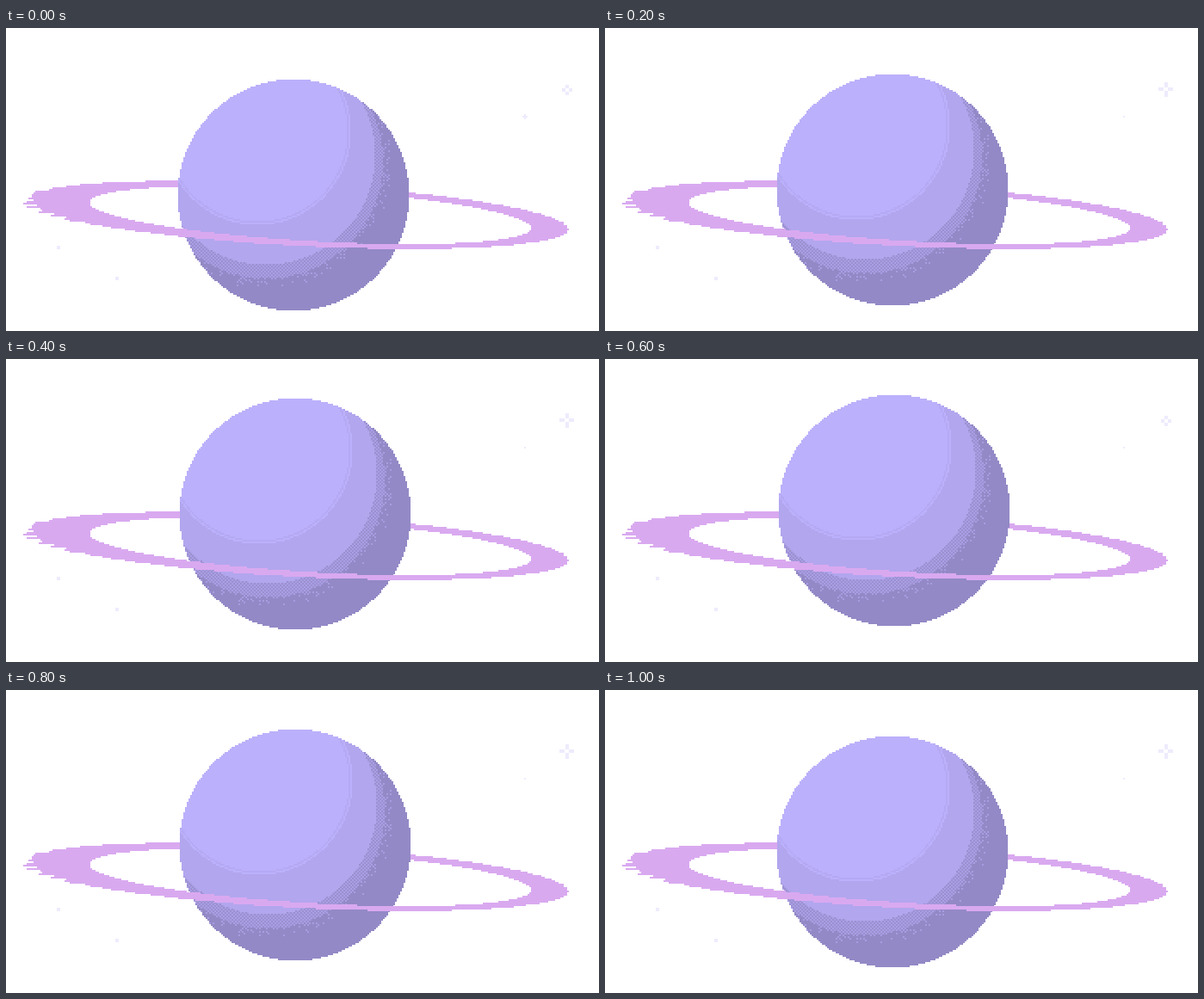
Write an HTML page with a canvas that moves like this. It is 689 px wide and 352 px high and loops after 1.2 s.

```html
<!DOCTYPE html>
<html lang="en">
<head>
<meta charset="utf-8">
<title>Floating planet</title>
<style>
  html, body { margin: 0; width: 100%; height: 100%; overflow: hidden; background: #fff; }
  canvas, svg { position: absolute; left: 0; top: 0; }
  #planet { left: 200px; top: 60px; animation: bob 1.2s step-end infinite; }
  svg { fill: #eeebfd; shape-rendering: crispEdges; }
  #small { animation: small 1.2s step-end infinite; }
  #large { animation: large 1.2s step-end infinite; }
  #plus { animation: plus 1.2s step-end infinite; }
  @keyframes bob {
    0%, 100% { transform: translate(0, 0); }
    16.6667%, 83.3333% { transform: translate(0, -6px); }
    33.3333%, 66.6667% { transform: translate(2px, -14px); }
    50% { transform: translate(2px, -18px); }
  }
  @keyframes small {
    0%, 50%, 100% { opacity: 1; }
    16.6667%, 66.6667% { opacity: 0; }
  }
  @keyframes large {
    0%, 50%, 100% { opacity: 0; }
    16.6667%, 66.6667% { opacity: 1; }
  }
  @keyframes plus {
    0%, 100% { opacity: 1; }
    16.6667% { opacity: 0; }
  }
</style>
</head>
<body>
<canvas id="back" width="689" height="352"></canvas>
<canvas id="planet" width="268" height="268"></canvas>
<canvas id="front" width="689" height="352"></canvas>
<svg width="689" height="352">
  <path id="small" d="M650 66h4v4h-4zM646 70h4v4h-4zM654 70h4v4h-4zM650 74h4v4h-4z"/>
  <path id="large" d="M650 63h4v6h-4zM643 69h6v4h-6zM654 69h6v4h-6zM650 73h4v7h-4z"/>
  <path id="plus" d="M602 100h2v6h-2zM600 102h6v2h-6z"/>
  <path d="M602 102h2v2h-2zM59 253h4v4h-4zM127 289h4v4h-4z"/>
</svg>
<script>
  const CELL = 2;
  const LIGHT = '#bbb0fb', EDGE = '#b5a9f4', MID = '#b2a6ee', DARK = '#9389c6', RING = '#d9a9f0';
  const WEAVE = ['#9b90d0', '#aa9ee4'], SPECK = '#a89de2';
  const ctxOf = id => document.getElementById(id).getContext('2d');

  // Repeatable pseudo-random value in 0..1
  function hash(x, y) {
    const s = Math.sin(x * 12.9898 + y * 78.233) * 43758.5453;
    return s - Math.floor(s);
  }

  // Paint a grid of cells; shade(x, y) gives a colour or nothing
  function paint(ctx, x0, y0, x1, y1, shade) {
    for (let y = y0; y < y1; y += CELL) {
      for (let x = x0; x < x1; x += CELL) {
        const colour = shade(x + 1, y + 1);
        if (!colour) continue;
        ctx.fillStyle = colour;
        ctx.fillRect(x, y, CELL, CELL);
      }
    }
  }

  function planetShade(x, y) {
    if (Math.hypot(x - 134, y - 134) > 134.6) return null;
    const glow = Math.hypot(x - 92, y - 60);
    if (glow < 109) return glow > 105 && glow < 107 ? EDGE : LIGHT;
    if (Math.hypot(x - 102, y - 88) < 127) return MID;
    const depth = Math.hypot(x - 102, y - 95) - 136;
    const col = x >> 1, row = y >> 1, odd = (col + row) % 2;
    if (depth < 0) return WEAVE[odd];
    return odd && hash(col, row) < 0.4 * (1 - depth / 13) ? SPECK : DARK;
  }

  // Ellipses tilted by a vertical shear
  const outer = { cx: 338.5, cy: 217, rx: 314.5, ry: 36, tilt: 0.0525 };
  const inner = { cx: 353.5, cy: 217.5, rx: 256.5, ry: 30, tilt: 0.0585 };

  function inside(e, x, y) {
    const dx = x - e.cx;
    return Math.hypot(dx / e.rx, (y - e.cy - e.tilt * dx) / e.ry) < 1;
  }

  // Each row is nudged sideways, most of all at the frayed left tip
  function ringShade(x, y) {
    const fray = x < 90 ? 16 : 4;
    const nudge = (hash(y, 3) - 0.5) * fray;
    return inside(outer, x + nudge, y) && !inside(inner, x, y) ? RING : null;
  }

  paint(ctxOf('back'), 18, 175, 660, 261, ringShade);
  paint(ctxOf('planet'), 0, 0, 268, 268, planetShade);
  paint(ctxOf('front'), 18, 211, 660, 261, ringShade);
</script>
</body>
</html>
```
